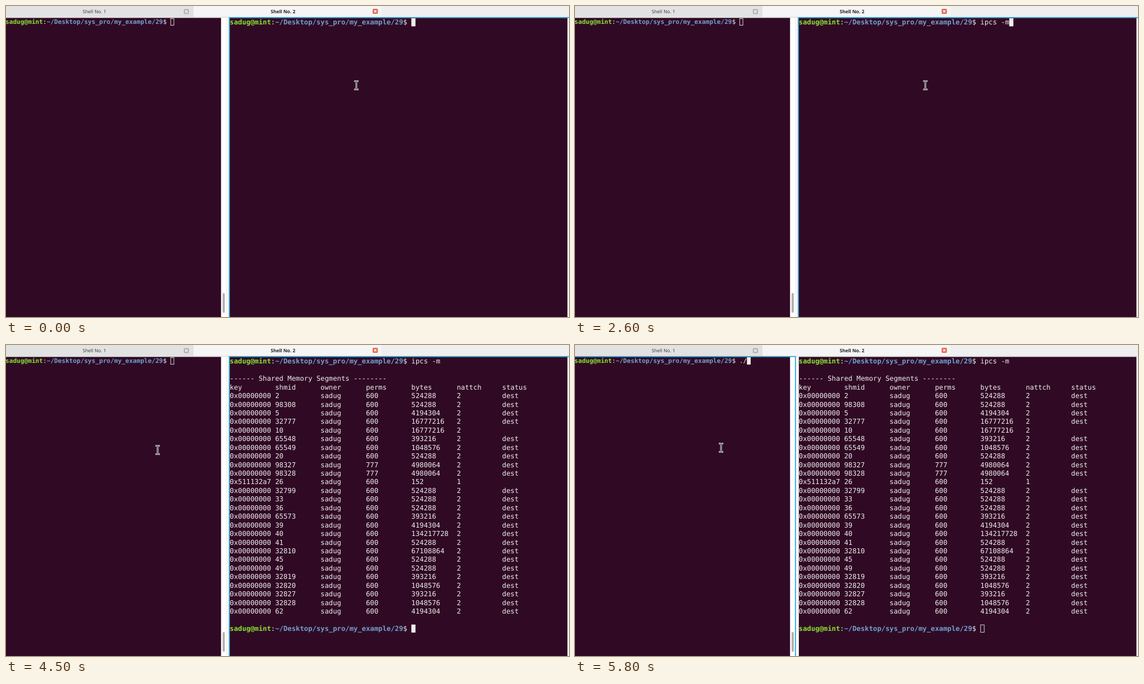
An HTML page for the animation above (8000 ms loop, 1006x557 px).

```html
<!DOCTYPE html>
<html lang="en">
<head>
<meta charset="utf-8">
<title>Split terminal</title>
<style>
html, body { margin: 0; width: 100%; height: 100%; overflow: hidden; background: #300a24; }
svg { position: absolute; left: 0; top: 0; display: block; }
text { white-space: pre; text-rendering: geometricPrecision; }
.term { font-family: "DejaVu Sans Mono", monospace; fill: #eeeeec; }
.tab { font: 8.45px "Noto Sans", sans-serif; fill: #3c3c3c; text-anchor: middle; }
.on { font-weight: 700; fill: #222; }
.user { font-weight: 700; fill: #8ae234; }
.path { font-weight: 700; fill: #729fcf; }
.focus { fill: none; stroke: #1b9fdc; stroke-width: 1.6; }
</style>
</head>
<body>
<svg id="stage" width="1006" height="557" viewBox="0 0 1006 557">
  <rect width="1006" height="557" fill="#f6f5f4"/>
  <rect width="1006" height="20" fill="#efefef"/>
  <rect width="335" height="19.5" fill="#e2e2e2"/>
  <rect x="335" width="336" height="20" fill="#f5f5f5"/>
  <rect y="19.5" width="1006" height="1" fill="#d5d5d5"/>
  <text class="tab" x="158" y="13">Shell No. 1</text>
  <text class="tab on" x="495" y="12.6">Shell No. 2</text>
  <g id="close" fill="none"></g>

  <rect y="21.3" width="384.5" height="536" fill="#300a24"/>
  <rect x="384.5" y="21" width="8.5" height="536" fill="#fff"/>
  <rect x="387" y="514" width="4" height="35.5" rx="2" fill="#b5b3b1"/>
  <rect x="400" y="21.3" width="603.5" height="536" fill="#300a24"/>
  <rect x="1003.5" y="21" width="2.5" height="536" fill="#fff"/>
  <path id="leftFocus" class="focus" d="M0 20.7H393.8V557"/>
  <path id="rightFocus" class="focus" d="M1006 20.7H399V557"/>

  <g id="left" class="term" font-size="11.13"></g>
  <g id="right" class="term" font-size="12.25"></g>
  <g id="output" class="term" font-size="12.25"></g>
  <rect id="leftCaret"/>
  <rect id="rightCaret"/>
  <g id="pointer" fill="none">
    <path d="M-4-7.3H-1.5L0-6.3L1.5-7.3H4M0-6.3V6.3M-4 7.3H-1.5L0 6.3L1.5 7.3H4" stroke="#fff" stroke-width="2.8"/>
    <path d="M-3.6-7.3H-1.5L0-6.3L1.5-7.3H3.6M0-6.3V6.3M-3.6 7.3H-1.5L0 6.3L1.5 7.3H3.6" stroke="#111" stroke-width="1"/>
  </g>
</svg>
<script>
const LOOP = 8000, USER = "sadug", PROMPT_LEN = 44;
const LEFT = { x: -1, base: 32.1, cell: 6.7, top: 22, height: 13 };
const RIGHT = { x: 399.8, base: 33.3, cell: 7.375, top: 22, height: 14.4 };
const LINE = 15.44;
const COMMAND = "ipcs -m", TYPED = [300, 600, 1100, 1300, 1600, 2100, 2600];
const RUN = "./", RUN_TYPED = [5400, 5800];
const ENTER = 2900, SWITCH = 4600;

// "shmid bytes" for each segment
const SEGMENTS = `2 524288,98308 524288,5 4194304,32777 16777216,10 16777216,
65548 393216,65549 1048576,20 524288,98327 4980064,98328 4980064,26 152,
32799 524288,33 524288,36 524288,65573 393216,39 4194304,40 134217728,
41 524288,32810 67108864,45 524288,49 524288,32819 393216,32820 1048576,
32827 393216,32828 1048576,62 4194304`.split(",").map(s => s.trim().split(" "));

const $ = id => document.getElementById(id);

function add(parent, tag, attrs, content = "") {
  const el = document.createElementNS("http://www.w3.org/2000/svg", tag);
  for (const k in attrs) el.setAttribute(k, attrs[k]);
  el.textContent = content;
  return parent.appendChild(el);
}

function addPrompt(parent, pane, row = 0) {
  const y = pane.base + row * LINE;
  const put = (col, s, cls) => add(parent, "text", { x: pane.x + col * pane.cell, y, class: cls }, s);
  put(0, USER + "@mint", "user");
  put(10, ":", "plain");
  put(11, "~/Desktop/sys_pro/my_example/29", "path");
  put(42, "$", "plain");
  return put(PROMPT_LEN, "", "plain");
}

function segmentRow([id, bytes]) {
  const own = id === "26";
  const perms = /^9832/.test(id) ? "777" : "600";
  const status = own || id === "10" ? "" : "dest";
  return [own ? "0x511132a7" : "0x00000000", id, USER, perms, bytes, own ? "1" : "2", status];
}

function addOutput() {
  const rows = [["key", "shmid", "owner", "perms", "bytes", "nattch", "status"], ...SEGMENTS.map(segmentRow)];
  const lines = ["------ Shared Memory Segments --------", ...rows.map(r => r.map(c => c.padEnd(11)).join(""))];
  lines.forEach((s, i) =>
    add($("output"), "text", { x: RIGHT.x, y: RIGHT.base + (i + 2) * LINE }, s.trimEnd()));
  addPrompt($("output"), RIGHT, 31);
}

function addClose(x, y, color) {
  add($("close"), "rect", { x: x - 4.6, y: y - 4.4, width: 9.2, height: 8.8, rx: 1.5, fill: color });
  add($("close"), "path", { d: `M${x - 2} ${y - 2}l4 4m0-4l-4 4`, stroke: "#fff", "stroke-width": 1.3 });
}

function placeCaret(el, pane, col, row, solid) {
  const inset = solid ? 0 : 0.5;
  const attrs = {
    x: pane.x + (PROMPT_LEN + col) * pane.cell + inset,
    y: pane.top + row * LINE + inset,
    width: pane.cell - 2 * inset, height: pane.height - 2 * inset,
    fill: solid ? "#eeeeec" : "none", stroke: solid ? "none" : "#eeeeec", "stroke-width": 0.9
  };
  for (const k in attrs) el.setAttribute(k, attrs[k]);
}

function pointerAt(t) {
  if (t >= 4900) return [261, 184];
  if (t >= 4800) return [265, 185];
  const step = Math.max(0, Math.min(6, Math.floor((t - 3900) / 100)));
  const u = step / 6, k = u * u * (3 - 2 * u);
  return [626 - 355 * k, 142 + 46 * k];
}

const countUpTo = (times, t) => times.filter(s => s <= t).length;
const show = (id, on) => $(id).setAttribute("visibility", on ? "visible" : "hidden");

addClose(322.3, 10, "#b4b4b4");
addClose(659.8, 9.5, "#e2674a");
const leftInput = addPrompt($("left"), LEFT);
const rightInput = addPrompt($("right"), RIGHT);
addOutput();

function draw(t) {
  const typed = countUpTo(TYPED, t), runTyped = countUpTo(RUN_TYPED, t);
  const done = t >= ENTER, leftActive = t >= SWITCH;
  rightInput.textContent = COMMAND.slice(0, typed);
  leftInput.textContent = RUN.slice(0, runTyped);
  show("output", done);
  show("leftFocus", leftActive);
  show("rightFocus", !leftActive);
  placeCaret($("leftCaret"), LEFT, runTyped, 0, leftActive);
  placeCaret($("rightCaret"), RIGHT, done ? 0 : typed, done ? 31 : 0, !leftActive);
  $("pointer").setAttribute("transform", `translate(${pointerAt(t)})`);
}

const start = performance.now();
function tick() {
  draw((performance.now() - start) % LOOP);
  requestAnimationFrame(tick);
}
draw(0);
requestAnimationFrame(tick);
</script>
</body>
</html>
```
